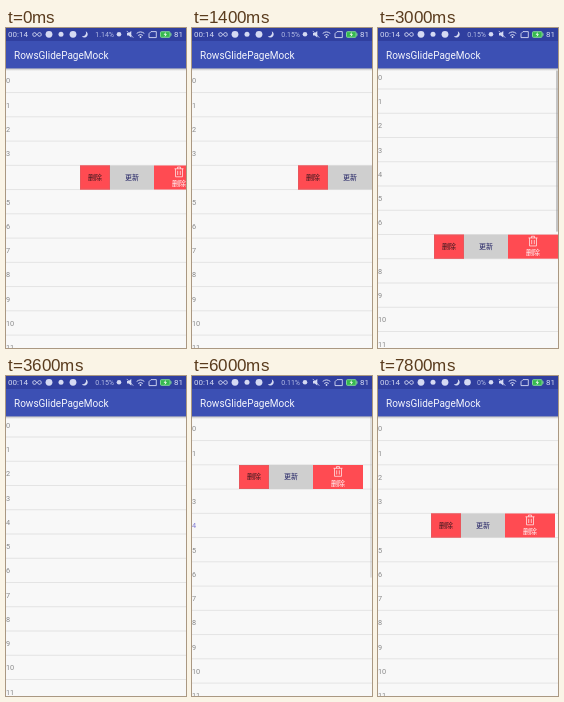
Write an HTML page that moves like this. It is 180 by 320 pixels and loops after 8000 ms.

```html
<!DOCTYPE html>
<html lang="zh">
<head>
<meta charset="utf-8">
<title>Swipe list</title>
<style>
  html, body { margin: 0; width: 100%; height: 100%; overflow: hidden; background: #f8f8f8; }
  svg { display: block; width: 100vw; height: 100vh; }
  text { font-family: Roboto, "Noto Sans CJK SC", "Noto Sans CJK", sans-serif; }
  .num { font-size: 7.3px; fill: #8a8a8a; }
  .num.marked { fill: #7f79d2; }
  .label { font: 7px "Noto Sans CJK SC", "Noto Sans CJK", sans-serif; text-anchor: middle; }
  .status { font-size: 8px; fill: #d5daf3; }
  .line { fill: none; stroke: #d5daf3; stroke-linecap: round; stroke-linejoin: round; }
</style>
</head>
<body>
<svg viewBox="0 0 180 320">
  <defs>
    <linearGradient id="shade" x2="0" y2="1">
      <stop stop-color="#000" stop-opacity=".26"/>
      <stop offset="1" stop-color="#000" stop-opacity="0"/>
    </linearGradient>
  </defs>
  <rect width="180" height="320" fill="#f8f8f8"/>
  <g id="list"></g>
  <rect id="thumb" x="178" width="2" height="161" fill="#949494"/>
  <rect y="40" width="180" height="3" fill="url(#shade)"/>
  <rect y="12" width="180" height="28.4" fill="#3c50b4"/>
  <rect width="180" height="13" fill="#303f9f"/>
  <text x="8" y="30.5" font-size="10" fill="#f4f5fc">RowsGlidePageMock</text>

  <g class="status">
    <text x="2" y="9.4">00:14</text>
    <path class="line" d="M31 6.5C29 3.8 26.8 4.3 26.8 6.5S29 9.2 31 6.5S35.2 4.3 35.2 6.5S33 9.2 31 6.5"/>
    <circle cx="43" cy="6.3" r="3.4"/>
    <circle cx="55" cy="6.3" r="2.5"/>
    <circle cx="67" cy="6.3" r="3.4"/>
    <path d="M79.8 3.2A3.3 3.3 0 1 1 75.8 8.2A3.6 3.6 0 0 0 79.8 3.2"/>
    <circle id="notice" cx="89.5" cy="6.3" r="3.3"/>
    <text id="load" x="108" y="8.8" font-size="7" text-anchor="end" fill="#b4bde6"></text>
    <circle cx="113" cy="6.3" r="2.3"/>
    <path d="M121 5h1.7l2.6-2v6.6l-2.6-2H121z"/>
    <path class="line" stroke-width=".8" d="M121 3.2l6 6.2"/>
    <path class="line" d="M131 5.2Q134.5 2.4 138 5.2M132.5 7.2Q134.5 5.6 136.5 7.2"/>
    <circle cx="134.5" cy="9" r=".9"/>
    <path class="line" stroke-width=".9" d="M143 9.2V5.7L145 3.6H150.3V9.2Z"/>
    <rect x="154.5" y="3.7" width="9.5" height="5.6" rx=".8" fill="#35b94e" stroke="#7fd694"/>
    <rect x="164.3" y="5.3" width="1.2" height="2.4" fill="#7fd694"/>
    <path d="M160 4l-2.4 2.8h1.6l-.6 2.2 2.4-2.8h-1.6z" fill="#fff"/>
    <text x="168" y="9.4">81</text>
  </g>
</svg>
<script>
const LOOP = 8000, STEP = 200, PITCH = 24.25, TOP = 40.3, WIDTH = 180, MENU = 124;
const swipes = [
  { row: 4, open: -216, close: 1147 },
  { row: 7, open: 1686, close: 3100 },
  { row: 2, open: 5416, close: 6700 },
  { row: 4, open: 7105, close: LOOP }
];
const loads = ['1.14%', '0.15%', '0.11%', '0%'];

const byId = id => document.getElementById(id);
const ramp = (t, from, span) => Math.min(1, Math.max(0, (t - from) / span));
const easeOutBack = u => 1 + 2.7 * (u - 1) ** 3 + 1.7 * (u - 1) ** 2;

// Share of the menu that is pulled out; it overshoots on opening.
const pulled = (t, { open, close }) =>
  t < open ? 0 : easeOutBack(ramp(t, open, 800)) * (1 - ramp(t, close, 400) ** 2);

const flash = (t, from, to) => ramp(t, from, STEP) * (1 - ramp(t, to, 800));

const cell = (x, width, fill, text, ink, baseline = 14.7) => `
  <rect x="${x}" y=".2" width="${width}" height="24" fill="${fill}"/>
  <text class="label" x="${x + width / 2}" y="${baseline}" fill="${ink}">${text}</text>`;

const menu = cell(0, 30, '#ff4b52', '删除', '#34161c')
  + '<rect x=".5" y=".7" width="29" height="23" fill="none" stroke="#e9565c"/>'
  + cell(30, 44, '#cfcfcf', '更新', '#1c1c60')
  + cell(74, 50, '#ff4b52', '删除', '#fff', 20.8)
  + `<path d="M94.5 3.5H103.5M97.5 3.5V1.8H100.5V3.5M95.5 3.5V11.5H102.5V3.5M97.7 5.5V9.7M100.3 5.5V9.7"
      fill="none" stroke="#ffe3e4" stroke-width=".8"/>`;

byId('list').innerHTML = Array.from({ length: 13 }, (_, i) => `
  <g transform="translate(0 ${TOP + i * PITCH})">
    <rect y="23.8" width="180" height="1" fill="#e4e4e4"/>
    <g id="row${i}">
      <text class="num" id="num${i}" y="15.2">${i}</text>
      <g transform="translate(${WIDTH} 0)">${swipes.some(s => s.row === i) ? menu : ''}</g>
    </g>
  </g>`).join('');

function draw(now) {
  const t = Math.floor(now % LOOP / STEP) * STEP;
  const offset = 3.6 * (ramp(t, 1600, 400) - ramp(t, 4200, 400));
  byId('list').setAttribute('transform', `translate(0 ${-offset})`);
  byId('thumb').setAttribute('y', 40.5 + offset * 0.58);
  byId('thumb').setAttribute('opacity', flash(t, 1600, 2600) + flash(t, 4000, 5400));

  const shift = {};
  for (const swipe of swipes) shift[swipe.row] = (shift[swipe.row] || 0) + pulled(t, swipe);
  for (const row in shift) {
    byId('row' + row).setAttribute('transform', `translate(${-Math.round(MENU * shift[row])} 0)`);
  }

  byId('num4').classList.toggle('marked', t >= 4600);
  const load = Math.floor((t + 2000) / 3000);
  byId('load').textContent = loads[load];
  byId('notice').setAttribute('visibility', load === 3 ? 'visible' : 'hidden');
}

const start = performance.now();
function tick() {
  draw(performance.now() - start);
  requestAnimationFrame(tick);
}
tick();
</script>
</body>
</html>
```
